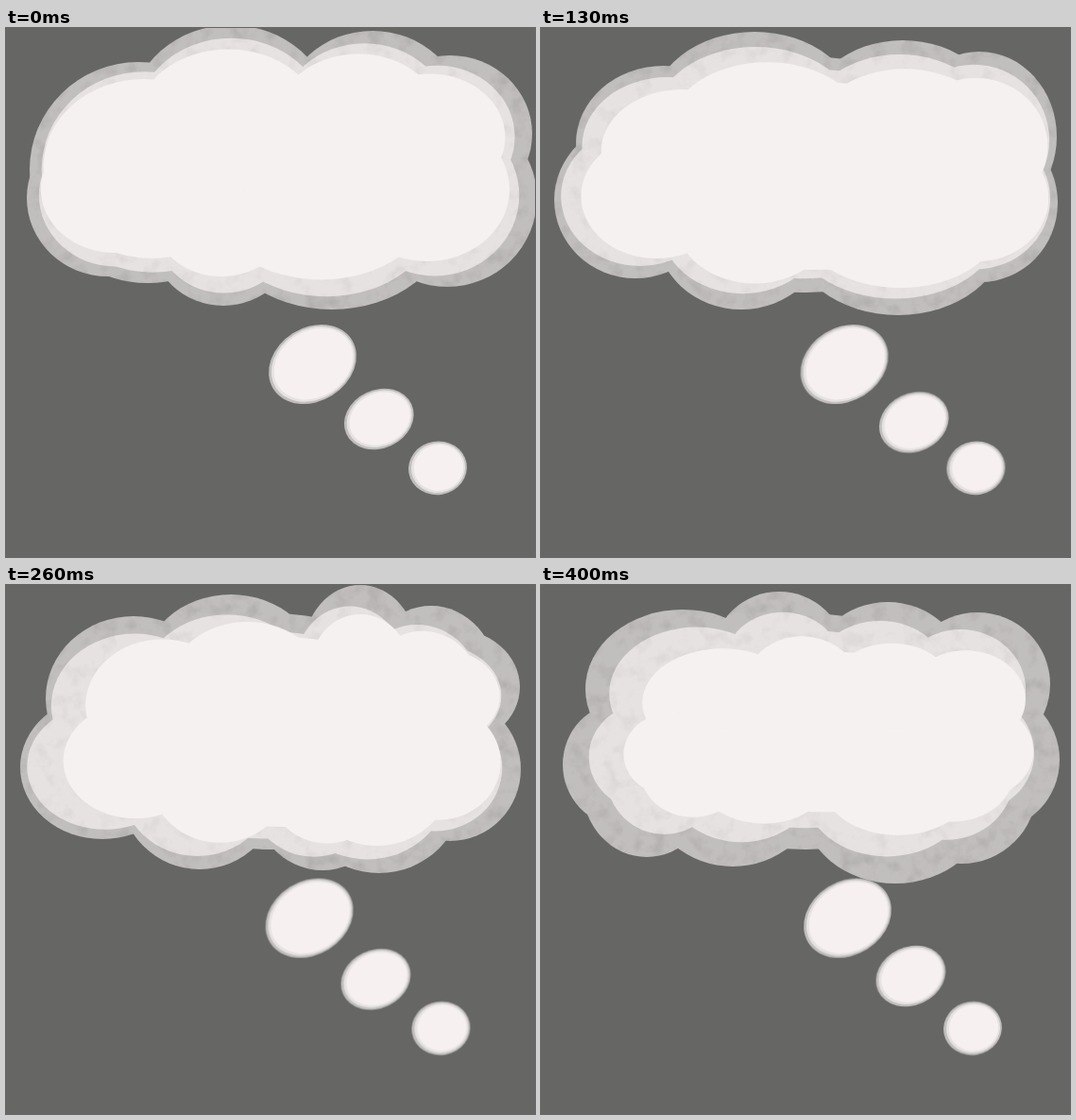
Recreate the animation shown at these times as an HTML page. Size 560 by 560 pixels, loop 0.53 s.

```html
<!DOCTYPE html>
<html lang="en">
<head>
<meta charset="utf-8">
<title>Thought bubble</title>
<style>
  html, body { margin: 0; width: 100%; height: 100%; overflow: hidden; background: #666764; }
  svg { display: block; width: 560px; height: 560px; overflow: hidden; fill: #f7f2f2; }
  .outer { opacity: .63; }
  .mid { opacity: .7; }
  .inner { opacity: .96; }
  #clouds, .puff { animation: strip 530ms step-end infinite; }
  .puff { animation-name: circle; }
  @keyframes strip {
    0% { transform: translateX(0); }
    24.528% { transform: translateX(-700px); }
    49.057% { transform: translateX(-1400px); }
    75.472%, 100% { transform: translateX(-2100px); }
  }
  /* Four corners of a small square; (--x, --y) is the first step. */
  @keyframes circle {
    0% { transform: translate(0, 0); }
    24.528% { transform: translate(var(--x), var(--y)); }
    49.057% { transform: translate(calc(var(--x) - var(--y)), calc(var(--x) + var(--y))); }
    75.472%, 100% { transform: translate(calc(0px - var(--y)), var(--x)); }
  }
</style>
</head>
<body>
<svg viewBox="0 0 560 560">
  <defs>
    <filter id="wash" color-interpolation-filters="sRGB">
      <feTurbulence type="fractalNoise" baseFrequency=".06" numOctaves="4" seed="7"/>
      <feColorMatrix values="0 0 0 0 1  0 0 0 0 1  0 0 0 0 1  0 0 0 .4 .78"/>
      <feComposite in="SourceGraphic" operator="in"/>
    </filter>
  </defs>
  <g id="clouds"></g>
  <g id="puffs"></g>
</svg>
<script>
// Lobes are "cx cy rx ry"; mid and inner are insets: left, top, right, bottom.
const clouds = [
  {
    lobes: "140 150 115 114, 108 180 86 83, 150 190 100 80, 230 220 77 74, 345 200 125 98, 467 180 95 94, 470 112 87 83, 388 90 95 87, 238 90 105 93",
    mid: [13, 13, 18, 14],
    inner: [15, 24, 28, 32]
  },
  {
    lobes: "100 182 86 83, 130 122 93 82, 226 90 110 86, 383 100 105 87, 464 115 82 90, 465 185 82 84, 378 215 115 89, 212 215 90 83",
    mid: [7, 16, 8, 17],
    inner: [28, 32, 10, 28]
  },
  {
    lobes: "102 193 87 76, 135 120 93 87, 238 95 95 85, 375 70 60 70, 450 100 70 78, 472 108 72 62, 470 195 75 76, 395 215 90 90, 335 220 75 82, 205 215 85 86",
    mid: [7, 22, 20, 14],
    inner: [45, 30, 22, 28]
  },
  {
    lobes: "150 110 103 84, 252 75 70 68, 367 90 80 72, 462 105 77 76, 475 185 74 75, 445 215 80 80, 375 235 97 81, 203 220 88 78, 112 215 68 73, 85 190 62 65",
    mid: [28, 22, 27, 26],
    inner: [65, 48, 28, 46]
  }
];
const core = "280 155 190 125";
const box = { x: 20, y: 5, w: 530, h: 295 };

const puffs = [
  { at: [324.5, 356], size: [49, 39], tilt: -32, step: [-3.4, 0] },
  { at: [394.8, 414], size: [38, 31], tilt: -25, step: [0, 3.4] },
  { at: [457, 465.8], size: [31, 28.3], tilt: -10, step: [3.4, 0] }
];

function node(name, attrs, parent) {
  const el = document.createElementNS("http://www.w3.org/2000/svg", name);
  for (const key in attrs) el.setAttribute(key, attrs[key]);
  return parent.appendChild(el);
}

// Squeezes the whole cloud box by the given insets.
function inset([left, top, right, bottom]) {
  const sx = 1 - (left + right) / box.w, sy = 1 - (top + bottom) / box.h;
  return `translate(${box.x + left} ${box.y + top}) scale(${sx} ${sy}) translate(${-box.x} ${-box.y})`;
}

function drawCloud(cloud, i) {
  const cell = node("g", { transform: `translate(${i * 700} 0)` }, document.getElementById("clouds"));
  const insets = { outer: [0, 0, 0, 0], mid: cloud.mid, inner: cloud.inner };
  for (const layer in insets) {
    const style = layer === "inner" ? {} : { filter: "url(#wash)" };
    const wrap = node("g", { class: layer, ...style }, cell);
    const g = node("g", { transform: inset(insets[layer]) }, wrap);
    for (const lobe of [core, ...cloud.lobes.split(", ")]) {
      const [cx, cy, rx, ry] = lobe.split(" ");
      node("ellipse", { cx, cy, rx, ry }, g);
    }
  }
}

function drawPuff({ at: [x, y], size: [rx, ry], tilt, step }) {
  const g = node("g", { class: "puff", style: `--x:${step[0]}px;--y:${step[1]}px` }, document.getElementById("puffs"));
  ["outer", "mid", "inner"].forEach((layer, k) => node("ellipse", {
    class: layer, rx: rx - 2.4 * k, ry: ry - 2 * k,
    transform: `translate(${x + k * .5} ${y - k * .2}) rotate(${tilt})`
  }, g));
}

clouds.forEach(drawCloud);
puffs.forEach(drawPuff);
</script>
</body>
</html>
```
